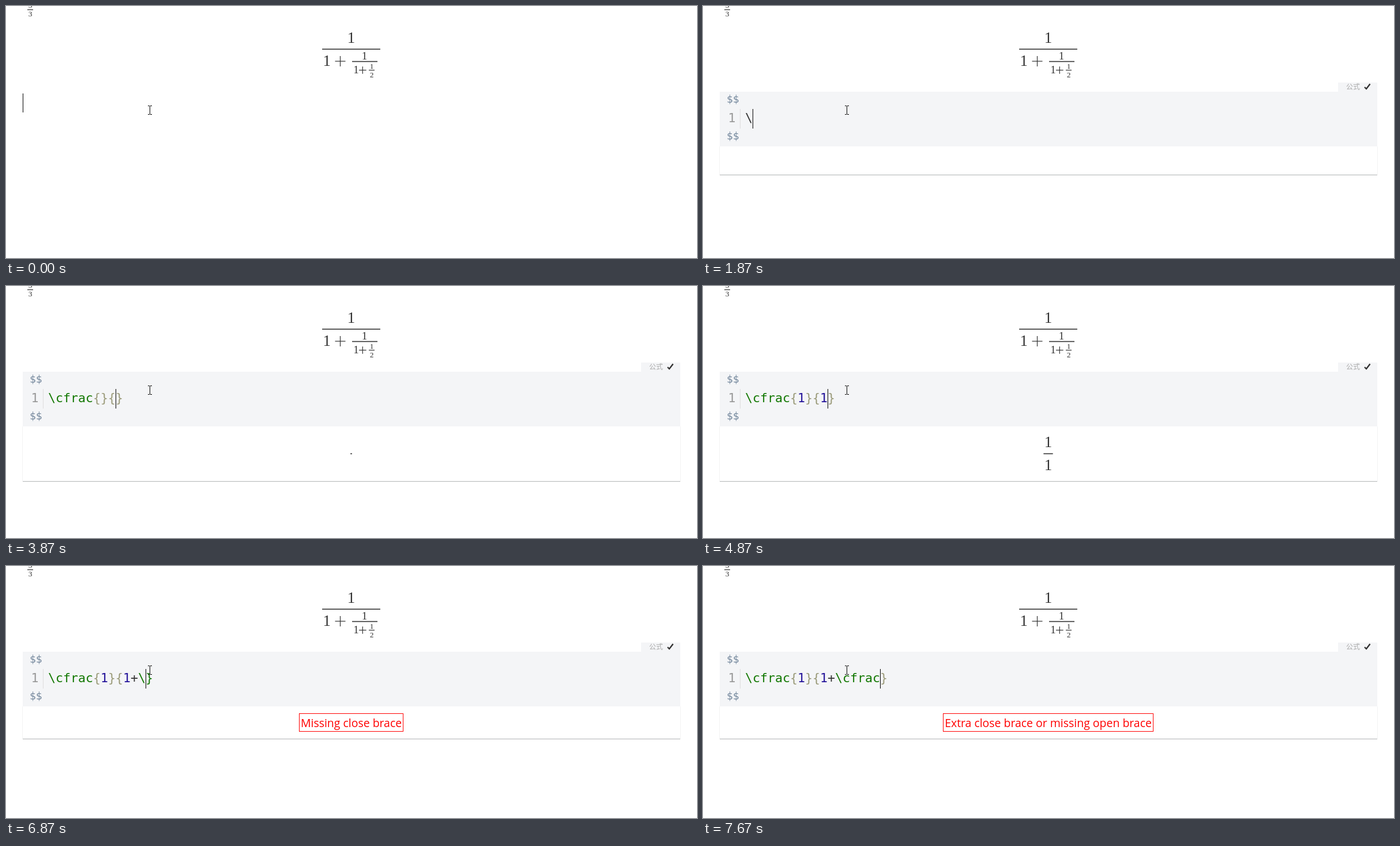
Write an HTML page with a canvas that moves like this. It is 1198 px wide and 438 px high and loops after 8 s.

```html
<!DOCTYPE html>
<html lang="zh">
<head>
<meta charset="utf-8">
<style>
  html, body { margin: 0; width: 100%; height: 100%; overflow: hidden; background: #fff; }
  canvas { display: block; }
</style>
</head>
<body>
<canvas id="stage" width="1198" height="438"></canvas>
<script>
const ctx = document.getElementById('stage').getContext('2d');
const LOOP = 8000, BLINK = 530, MID = 598.5, EM = 27;
const SERIF = '"Liberation Serif", serif';
const MONO = '"DejaVu Sans Mono", "Noto Sans CJK SC", monospace';
const SANS = '"Open Sans", sans-serif';
const CJK = '"Noto Sans CJK SC", "Noto Sans CJK", sans-serif';
const INK = '#333', RED = '#f00';

function rect(x, y, w, h, color) {
  ctx.fillStyle = color;
  ctx.fillRect(x, y, w, h);
}

function text(str, x, y, size, family, color = INK, align = 'left', spacing = 0) {
  ctx.font = `${size}px ${family}`;
  ctx.letterSpacing = spacing + 'px';
  ctx.textAlign = align;
  ctx.fillStyle = color;
  ctx.fillText(str, x, y);
  ctx.letterSpacing = '0px';
}

// Math pieces
const digit = (d, x, y, size = EM) => text(d, x, y, size, SERIF, INK, 'center');

function plus(x, y, size = EM) {
  const r = size / 3;
  rect(x - r, y - 0.6, 2 * r, 1.2, INK);
  rect(x - 0.6, y - r, 1.2, 2 * r, INK);
}

const bar = (x, y, w, h = 1.6) => rect(x, y - h / 2, w, h, INK);

// Fraction with "1" above and "1", "1+" or "1 + tail" below; returns the tail's x.
function fraction(y, num, den, tailWidth = 0) {
  const gap = tailWidth ? 6 : 0;
  const width = den.length > 1 ? 34.5 + 2 * gap + tailWidth : (num || den) ? 13.5 : 0;
  const x = MID - width / 2;
  bar(x - 1.4, y, width + 2.8);
  if (num) digit(num, MID, y - 11.2);
  if (den) digit('1', x + 6.75, y + 28.5);
  if (den.length > 1) plus(x + 24 + gap, y + 21);
  return x + 34.5 + 2 * gap;
}

// Previews: panel bottom and drawing
const macroWidths = { '\\': .5, c: .444, f: .306, r: .392, a: .5 };
const macroWidth = s => EM * [...s].reduce((sum, c) => sum + macroWidths[c], 0);
const macro = (s, x, y) => text(s, x + 1, y, EM, SERIF, RED, 'left', 1.8);

const blank = bottom => ({ bottom, draw() {} });
const unknown = s => ({ bottom: 296, draw: () => macro(s, MID - macroWidth(s) / 2, 279) });
const frac = (num = '', den = '') => ({ bottom: 339, draw: () => fraction(291.5, num, den) });
const fracMacro = s => ({
  bottom: 339,
  draw: () => macro(s, fraction(291.5, '1', '1+', macroWidth(s)), 320)
});
const fracComma = {
  bottom: 339,
  draw: () => text('、', fraction(291.5, '1', '1+', 11), 320, 24, CJK)
};
const error = message => ({
  bottom: 300,
  draw() {
    text(message, MID, 280, 19.44, SANS, RED, 'center');
    const w = Math.round(ctx.measureText(message).width) + 5;
    ctx.strokeStyle = RED;
    ctx.lineWidth = 1;
    ctx.strokeRect(Math.round(MID - w / 2) - 0.5, 256.5, w, 31);
  }
});

// Typing: time, text before the caret, text after it, preview
const F = '\\cfrac', G = F + '{1}{1+';
const noArgument = error('Missing argument for \\cfrac');
const steps = [
  [0],
  [930, '', '', blank(295)],
  [1870, '\\', '', blank(293)],
  [2070, '\\c', '', unknown('\\c')],
  [2270, '\\cf', '', unknown('\\cf')],
  [2470, '\\cfr', '', unknown('\\cfr')],
  [2530, '\\cfra', '', unknown('\\cfra')],
  [2730, F, '', noArgument],
  [3330, F + '{', '}', noArgument],
  [3400, F + '{}', '', noArgument],
  [3530, F + '{}{', '}', frac()],
  [3600, F + '{}{}', '', frac()],
  [3870, F + '{}{', '}', frac()],
  [4070, F + '{}', '{}', frac()],
  [4200, F + '{', '}{}', frac()],
  [4400, F + '{1', '}{}', frac('1')],
  [4530, F + '{1}', '{}', frac('1')],
  [4670, F + '{1}{', '}', frac('1')],
  [4870, F + '{1}{1', '}', frac('1', '1')],
  [5530, G, '}', frac('1', '1+')],
  [6270, G + '、', '}', fracComma],
  [6600, G, '}', frac('1', '1+')],
  [6870, G + '\\', '}', error('Missing close brace')],
  [6930, G + '\\c', '}', fracMacro('\\c')],
  [7270, G + '\\cf', '}', fracMacro('\\cf')],
  [7400, G + '\\cfr', '}', fracMacro('\\cfr')],
  [7470, G + '\\cfra', '}', fracMacro('\\cfra')],
  [7670, G + F, '}', error('Extra close brace or missing open brace')]
];

// Code line
const codeWidth = s => [...s].reduce((sum, c) => sum + (c === '、' ? 21.6 : 13), 0);

function tokenColor(token) {
  if (/^\\./.test(token)) return '#170';
  if (/[{}]/.test(token)) return '#997';
  return /\d/.test(token) ? '#219' : INK;
}

function codeLine(code) {
  let x = 73;
  for (const token of code.match(/\\[a-z]+|\\\}|./g) || []) {
    text(token, x, 202, 21.6, MONO, tokenColor(token));
    x += codeWidth(token);
  }
}

function document_() {
  digit('5', 42, 3, 13.5);
  bar(37, 6.5, 10, 1.2);
  digit('3', 42, 18, 13.5);

  fraction(75, '1', '1+', 51.5);
  digit('1', 621.5, 93, 19);
  bar(600, 96.5, 44);
  digit('1', 607, 117, 19);
  plus(618.3, 111.5, 19);
  digit('1', 634, 109, 13.5);
  bar(629, 111.5, 10, 1.2);
  digit('2', 634, 124, 13.5);
}

function editor(before, after, preview) {
  const { bottom } = preview;
  rect(1101, 133, 68, 16, '#f4f5f7');
  rect(29, 149, 1140, 95, '#f4f5f7');
  text('公式', 1115, 145, 12, CJK, '#aaa');
  ctx.strokeStyle = INK;
  ctx.lineWidth = 2.4;
  ctx.beginPath();
  ctx.moveTo(1147, 141);
  ctx.lineTo(1150, 144);
  ctx.lineTo(1156.5, 135.5);
  ctx.stroke();

  rect(28, 244, 1, bottom - 244, '#f3f3f3');
  rect(1169, 244, 1, bottom - 244, '#f3f3f3');
  rect(29, bottom, 1140, 1, '#bcbfc0');
  rect(29, bottom + 1, 1140, 1, '#f0f0f0');

  for (const y of [168, 232]) text('$$', 41, y, 18, MONO, '#72869b');
  text('1', 43.5, 202, 21.6, MONO, '#999');
  rect(64, 179, 1, 34, '#ddd');
  codeLine(before + after);
  preview.draw();
}

function pointer() {
  rect(249, 174, 1, 14, '#000');
  for (const y of [173, 188]) {
    rect(246, y, 3, 1, '#000');
    rect(250, y, 3, 1, '#000');
  }
}

function render(now) {
  const t = now % LOOP;
  const [start, before, after, preview] = steps.findLast(step => step[0] <= t);
  const caretOn = t - start < BLINK;
  rect(0, 0, 1198, 438, '#fff');
  document_();
  if (preview) {
    editor(before, after, preview);
    if (caretOn) rect(73 + Math.round(codeWidth(before)), 179, 1, 34, '#000');
  } else if (caretOn) {
    rect(29, 152, 1, 33, '#000');
  }
  pointer();
  requestAnimationFrame(render);
}
requestAnimationFrame(render);
</script>
</body>
</html>
```
